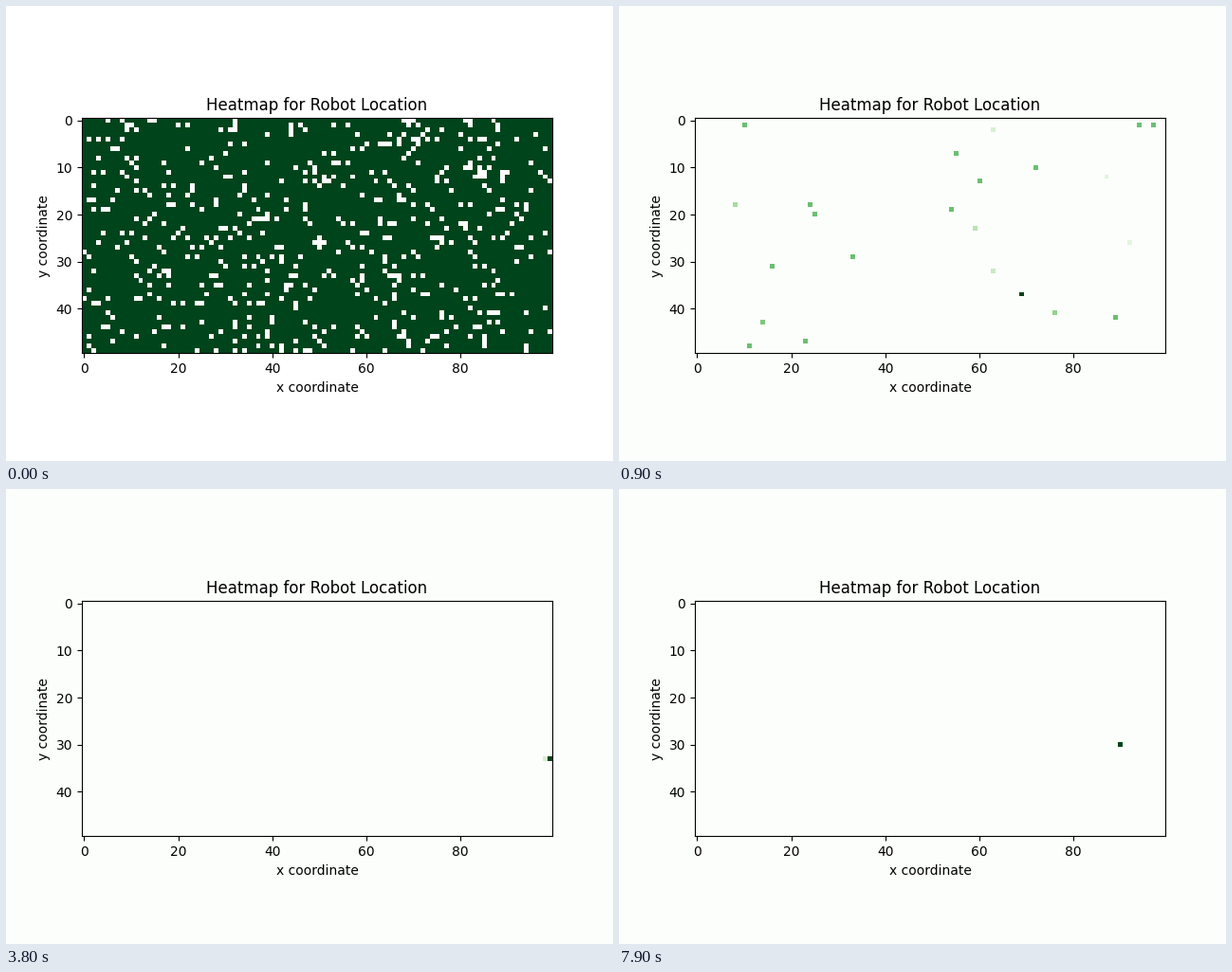
Recreate the animation shown at these times as a matplotlib script. Size 640 by 480 pixels, loop 8000 ms.

```python
import numpy as np
import matplotlib.pyplot as plt
from matplotlib.animation import FuncAnimation

COLS, ROWS = 100, 50
FRAMES, STEP_MS = 80, 100
PAPER = np.array([252, 254, 251]) / 255
GREENS = plt.get_cmap("Greens")

# One command per step; every hypothesis follows the same commands.
STEPS = {"L": (-1, 0), "R": (1, 0), "U": (0, -1), "D": (0, 1),
         "E": (1, 1), ".": (0, 0)}
MOVES = ("...RULDU.R.RULDR...E"
         "LDLDL.RRDLL.RRLRRR.LLLRLLRUUUR.D.L"
         "LR..ULUULDDLLDDRUULULD.L.")
OFFSET = np.cumsum([(0, 0)] + [STEPS[m] for m in MOVES], axis=0)

# Positions after the first 20 steps, where the robot overtakes the decoy
REF = 20
DECOY, ROBOT = (72, 38), (98, 30)
LASTING = [(36, 30), (92, 43), (58, 8)]
CROWD = 300

rng = np.random.default_rng(5)
crowd = rng.integers(0, (COLS, ROWS), (CROWD, 2))
crowd[:len(LASTING)] = LASTING
strong = rng.random(CROWD) < .15


def wall_map():
    walls = rng.random((ROWS, COLS)) < .095
    walls[23:30, 47:54] = False
    walls[26, 49:52] = walls[25:28, 50] = True
    return walls


WALLS = wall_map()


def place(cells, step):
    """Grid indices of cells, given at REF, at another step."""
    x, y = (np.asarray(cells) + OFFSET[step] - OFFSET[REF]).T
    return y % ROWS, x % COLS


def crowd_values(step):
    """Beliefs of the surviving crowd, which thins out exponentially."""
    count = np.exp(np.interp(step, [1, 3, 9, REF, 27],
                             np.log([CROWD, 240, 22, 3, .1])))
    rank = np.arange(int(round(count)))
    values = np.full(len(rank), np.interp(step, [9, REF, 27], [.52, .3, .1]))
    if step < 5:
        values[strong[rank]] = .92
    else:
        values *= np.clip((count - rank) / (.4 * count), .25, 1)
    return values


def mark_leader(belief, step, cell, value):
    """Draw a leading hypothesis and the faint cell it has just left."""
    if value > .9 and step > 9 and MOVES[step - 1] != ".":
        belief[place(cell, step - 1)] = .18
    here = place(cell, step)
    belief[here] = max(belief[here], value)


def belief_at(step):
    belief = np.zeros((ROWS, COLS))
    values = crowd_values(step)
    belief[place(crowd[:len(values)], step)] = values
    mark_leader(belief, step, DECOY, np.interp(step, [22, 28], [1, 0]))
    mark_leader(belief, step, ROBOT, np.interp(step, [13, 20, 24], [0, .7, 1]))
    return belief


def colours(step):
    if step == 0:
        return np.where(WALLS[..., None], 1.0, GREENS(1.0)[:3])
    belief = belief_at(step)
    return np.where(belief[..., None] > .03, GREENS(belief)[..., :3], PAPER)


fig, ax = plt.subplots(figsize=(6.4, 4.8), dpi=100)
image = ax.imshow(colours(0), interpolation="nearest")
ax.set_title("Heatmap for Robot Location")
ax.set_xlabel("x coordinate")
ax.set_ylabel("y coordinate")


def draw(step):
    fig.set_facecolor("white" if step == 0 else PAPER)
    image.set_data(colours(step))
    return [image]


anim = FuncAnimation(fig, draw, frames=FRAMES, interval=STEP_MS,
                     repeat=True, repeat_delay=0, blit=False)
plt.show()
```
